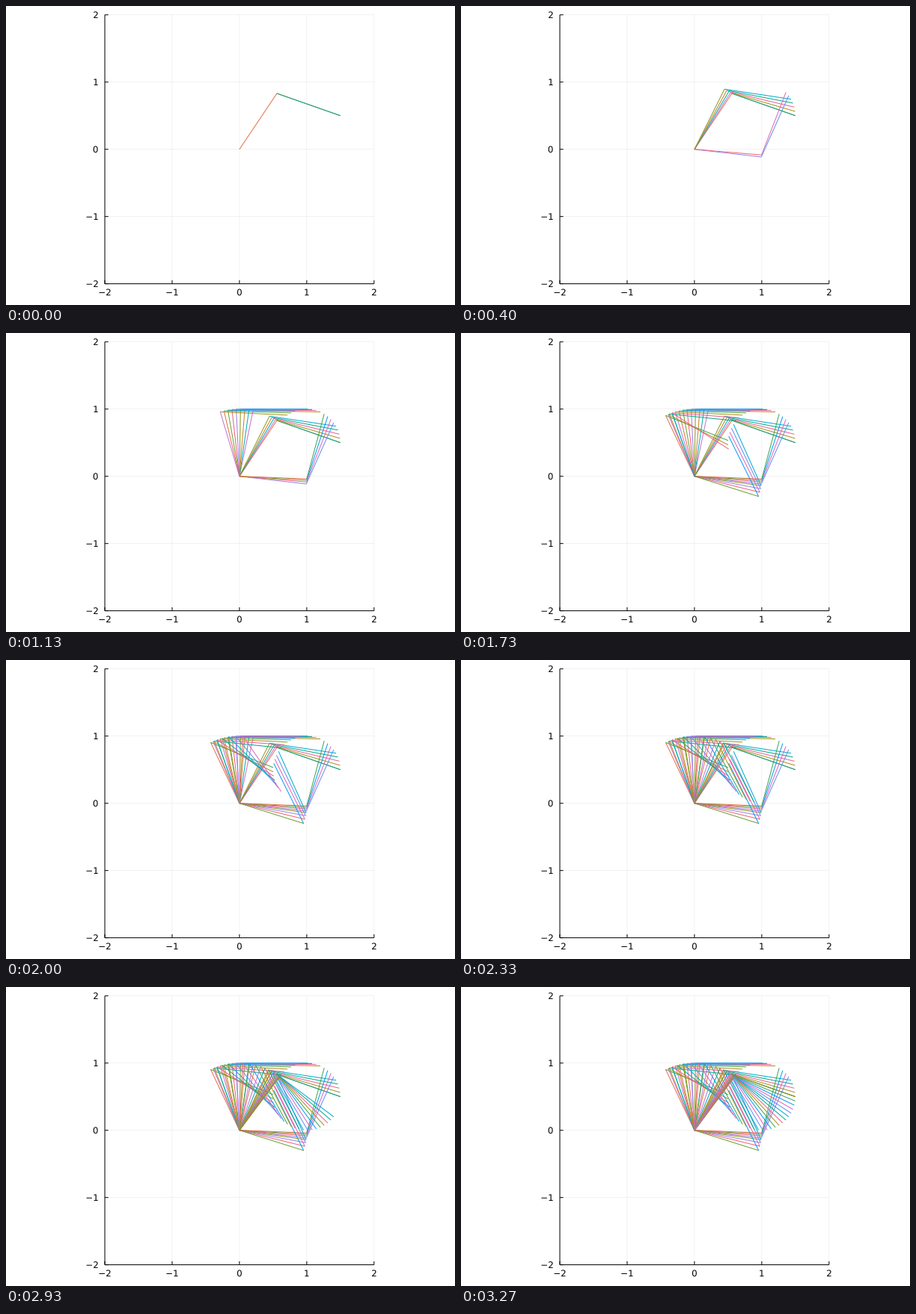
Write a matplotlib script that moves like this. It is 600 by 400 pixels and loops after 3340 ms.

```python
import numpy as np
import matplotlib.pyplot as plt
from matplotlib.animation import FuncAnimation
from matplotlib.collections import LineCollection
from matplotlib.patches import PathPatch
from matplotlib.textpath import TextPath

WIDTH, HEIGHT, DPI = 600, 400, 100
PX = 72 / DPI  # one pixel in points
STEPS, STEPS_PER_SECOND = 50, 15
TICK_MS, LOOP_MS = 10, 3340
CENTER_X, CENTER_Y, SCALE = 311.95, 208.29, 89.95
FONT_PX = 11.85
ELBOW_DOWN = {5, 6, 7, 8, 20, 21, 22, 23}
PALETTE = [
    "#009AFA", "#E36F47", "#3EA44E", "#C371D2", "#AC8E18", "#00AAAE",
    "#ED5E93", "#C68225", "#00A98D", "#8E971E", "#00A9CC", "#9B7FE9",
    "#618DF6", "#F06073", "#DD65B6", "#6C9F33",
]

fig = plt.figure(figsize=(WIDTH / DPI, HEIGHT / DPI), dpi=DPI, facecolor="white")
ax = fig.add_axes([0, 0, 1, 1])
ax.set_xlim(0, WIDTH)
ax.set_ylim(0, HEIGHT)
ax.axis("off")


def to_px(x, y):
    return CENTER_X + SCALE * x, CENTER_Y + SCALE * y


def rule(x0, y0, x1, y1, width=1.0, alpha=1.0):
    ax.plot([x0, x1], [y0, y1], color="black", lw=width * PX, alpha=alpha,
            solid_capstyle="butt", snap=False)


def label(text, x, baseline, align):
    """Place outlined text at sub-pixel position; align 0.5 centres, 1 ends at x."""
    glyphs = TextPath((0, 0), text, size=FONT_PX, prop={"family": "DejaVu Sans"})
    box = glyphs.get_extents()
    offset = x - (box.x0 + align * box.width)
    placed = TextPath((offset, baseline), text, size=FONT_PX,
                      prop={"family": "DejaVu Sans"})
    ax.add_patch(PathPatch(placed, facecolor="black", lw=0, snap=False))


def draw_axes():
    left, bottom = to_px(-2, -2)
    right, top = to_px(2, 2)
    ticks = [(t, *to_px(t, t)) for t in range(-2, 3)]
    for _, x, y in ticks:
        rule(x, bottom, x, top, width=0.5, alpha=0.1)
        rule(left, y, right, y, width=0.5, alpha=0.1)
    rule(left, bottom, right, bottom)
    rule(left, bottom, left, top)
    for t, x, y in ticks:
        rule(x, bottom, x, bottom + 4.7)
        rule(left, y, left + 4.7, y)
        text = str(t).replace("-", "\u2212")
        label(text, x, bottom - 15.6, align=0.5)
        label(text, left - 9.4, y - 4.32, align=1)


def solve_arm(step):
    """Elbow and hand of a unit two-link arm following a circle."""
    theta = 2 * np.pi * step / (STEPS - 1)
    hand_x, hand_y = 1 + 0.5 * np.cos(theta), 0.5 + 0.5 * np.sin(theta)
    bend = np.arccos(np.hypot(hand_x, hand_y) / 2)
    if step in ELBOW_DOWN:
        bend = -bend
    shoulder = np.arctan2(hand_y, hand_x) + bend
    return to_px(np.cos(shoulder), np.sin(shoulder)), to_px(hand_x, hand_y)


draw_axes()
segments = [solve_arm(0)]
for step in range(STEPS):
    elbow, hand = solve_arm(step)
    segments += [(to_px(0, 0), elbow), (elbow, hand)]
colors = [PALETTE[i % len(PALETTE)] for i in range(len(segments))]
links = LineCollection([], colors=colors, linewidths=PX, capstyle="butt",
                       snap=False, zorder=3)
ax.add_collection(links, autolim=False)


def update(frame):
    # Steps start at multiples of 1/15 s rounded to whole ticks.
    seconds = (frame + 0.5) * TICK_MS / 1000
    step = min(int(seconds * STEPS_PER_SECOND), STEPS - 1)
    links.set_segments(segments[:2 * step + 3])
    return [links]


anim = FuncAnimation(fig, update, frames=LOOP_MS // TICK_MS, interval=TICK_MS,
                     repeat=True, repeat_delay=0, blit=False)
plt.show()
```
